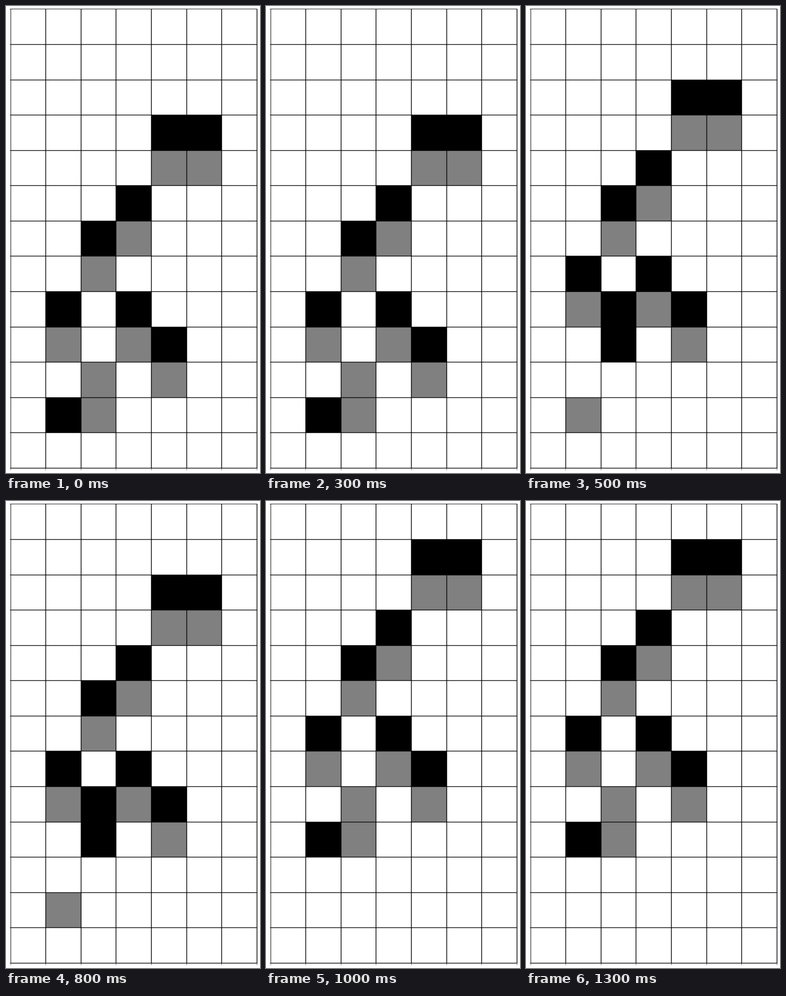
Recreate the animation shown at these times as an HTML page. Size 553 px wide and 1013 px high, loop 1500 ms.

```html
<!DOCTYPE html>
<html lang="en">
<head>
<meta charset="utf-8">
<title>Cell walker</title>
<style>
  html, body { margin: 0; width: 100%; height: 100%; overflow: hidden; background: #fff; }
  svg { display: block; width: 553px; height: 1013px; }
  .step { visibility: hidden; animation: show 1500ms step-end infinite; }
  @keyframes show {
    0% { visibility: visible; }
    33.3333%, 100% { visibility: hidden; }
  }
  .live { fill: #000; }
  .trail { fill: #808080; }
  .grid { stroke: #000; stroke-width: 1.6; }
  .edge { stroke: #000; stroke-width: 1.1; }
  .tick { stroke: #000; stroke-width: 1; stroke-opacity: .65; }
</style>
</head>
<body>
<svg id="stage" viewBox="0 0 553 1013"></svg>
<script>
  const COLS = 7, ROWS = 13, PITCH = 76.6, STEP = 500, LOOP = 1500;
  const stage = document.getElementById('stage');

  // Grid lines sit on pixel centres.
  const gridX = c => Math.floor(10.2 + c * PITCH) + 0.5;
  const gridY = r => Math.floor(6.8 + r * PITCH) + 0.5;

  function add(parent, tag, attrs) {
    const el = document.createElementNS('http://www.w3.org/2000/svg', tag);
    for (const key in attrs) el.setAttribute(key, attrs[key]);
    return parent.appendChild(el);
  }

  function cell(parent, c, r, kind) {
    const x = gridX(c), y = gridY(r);
    add(parent, 'rect', {
      x, y, width: gridX(c + 1) - x, height: gridY(r + 1) - y, class: kind
    });
  }

  function line(x1, y1, x2, y2, kind) {
    add(stage, 'line', { x1, y1, x2, y2, class: kind });
  }

  // [column, row below the head]; every body cell leaves a trail one row down.
  const body = [[4, 0], [5, 0], [3, 2], [2, 3], [1, 5], [3, 5], [4, 6]];
  const tails = [
    { live: [[1, 8]], trail: [[2, 7], [2, 8]] },
    { live: [[2, 6], [2, 7]], trail: [[1, 9]] }
  ];

  for (let i = 0; i < 3; i++) {
    const top = 3 - i, tail = tails[i % 2];
    const group = add(stage, 'g', { class: 'step' });
    group.style.animationDelay = (i ? i * STEP - LOOP : 0) + 'ms';
    for (const [c, r] of body) cell(group, c, top + r + 1, 'trail');
    for (const [c, r] of tail.trail) cell(group, c, top + r, 'trail');
    for (const [c, r] of [...body, ...tail.live]) cell(group, c, top + r, 'live');
  }

  const left = gridX(0), right = gridX(COLS);
  const head = gridY(0), foot = gridY(ROWS);
  for (let c = 0; c <= COLS; c++) {
    const x = gridX(c);
    line(x, head - 0.5, x, foot + 0.5, c ? 'grid' : 'edge');
    line(x, foot + 0.5, x, foot + 4.5, 'tick');
  }
  for (let r = 0; r <= ROWS; r++) {
    const y = gridY(r);
    line(left - 0.5, y, right + 0.5, y, r ? 'grid' : 'edge');
    line(left - 2.5, y, left - 0.5, y, 'tick');
  }
</script>
</body>
</html>
```
